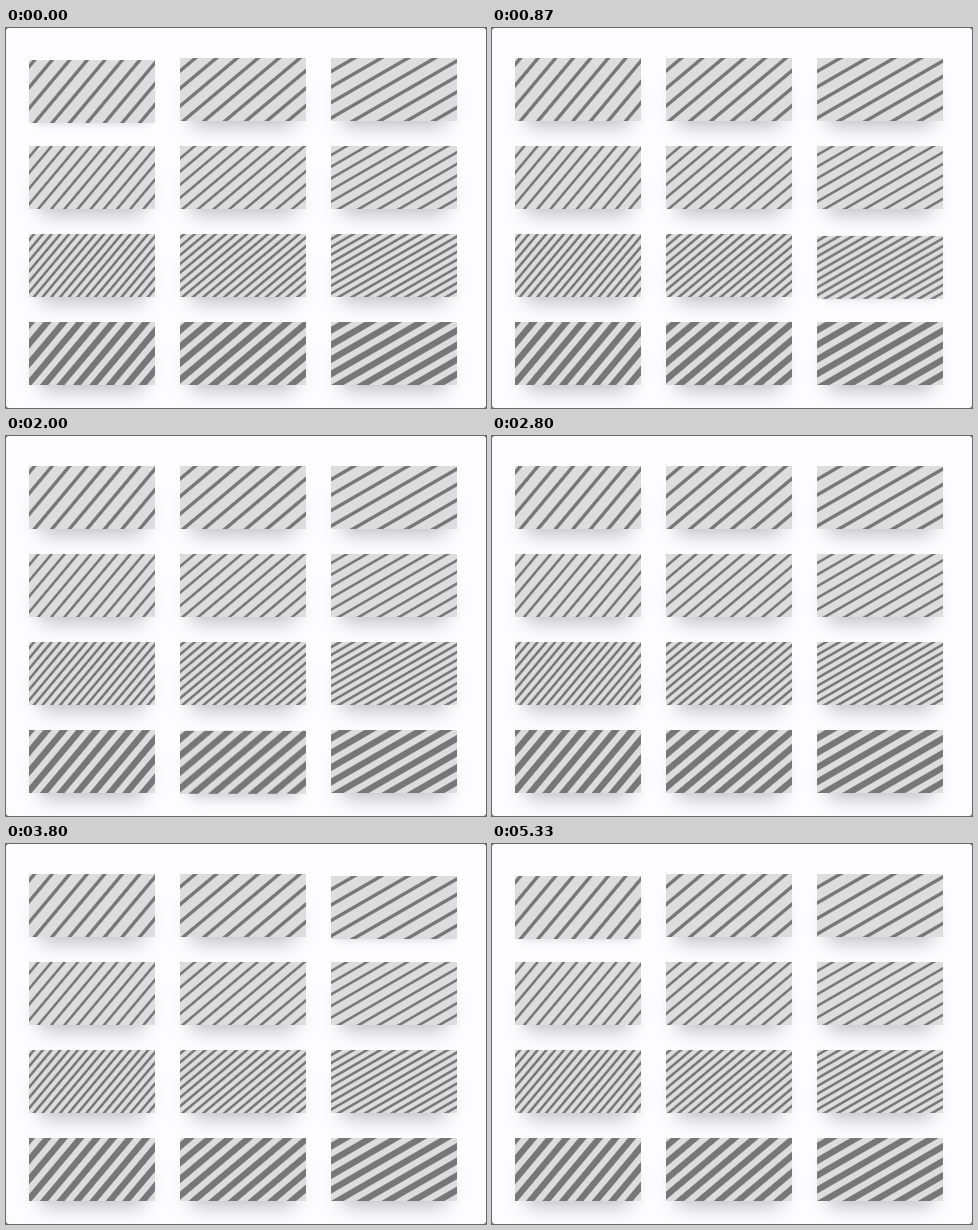
Animation of 480x380 px, one loop 5.47 s. Source, as an HTML page:

```html
<!DOCTYPE html>
<html lang="en">
<head>
<meta charset="utf-8">
<title>Striped cards</title>
<style>
  html, body {
    margin: 0;
    width: 100%;
    height: 100%;
    overflow: hidden;
    background: #666;
  }
  #stage {
    position: relative;
    width: 480px;
    height: 380px;
    overflow: hidden;
    border-radius: 3px;
    background: #fdfcfe;
  }
  /* Half-pixel ramps keep the stripe edges smooth. */
  .card {
    position: absolute;
    width: 126px;
    height: 63px;
    background: repeating-linear-gradient(
      var(--angle),
      #aaa 0,
      #ddd 0.5px calc(var(--gap) - 0.5px),
      #777 calc(var(--gap) + 0.5px) calc(var(--period) - 0.5px),
      #aaa var(--period));
  }
</style>
</head>
<body>
<div id="stage"></div>
<script>
  const LOOP = 5470;
  const FADE = 170;
  const SCALE = 0.84; // cards are 150 x 75 units
  const ANGLES = [-50, -40, -30];
  const STRIPES = [[12, 16], [9, 12], [5, 8], [7.5, 15]]; // gap, period in units

  const RAISED = {
    transform: 'translateY(0px)',
    boxShadow: '0 16px 20px -11px rgba(0, 0, 0, 0.26)'
  };
  const PRESSED = {
    transform: 'translateY(2px)',
    boxShadow: '0 5px 10px -6px rgba(0, 0, 0, 0.2)'
  };

  // Times at which a card, counted row by row, starts to change its pose.
  const TOGGLES = {
    0: [210, 5160],
    2: [3630, 4270],
    4: [300, 670, 2900, 3470, 4360, 5010],
    6: [2100, 2610],
    8: [760, 1250],
    10: [1360, 1940]
  };

  function keyframes(times, pressed) {
    const frames = [];
    const add = time => frames.push({
      ...(pressed ? PRESSED : RAISED),
      offset: time / LOOP,
      easing: 'ease'
    });
    add(0);
    for (const time of times) {
      add(time);
      pressed = !pressed;
      add(time + FADE);
    }
    add(LOOP);
    return frames;
  }

  const stage = document.getElementById('stage');
  STRIPES.forEach(([gap, period], row) => {
    ANGLES.forEach((angle, col) => {
      const index = row * ANGLES.length + col;
      const card = document.createElement('div');
      card.className = 'card';
      card.style.left = `${23 + col * 151}px`;
      card.style.top = `${30 + row * 88}px`;
      card.style.boxShadow = RAISED.boxShadow;
      card.style.setProperty('--angle', `${angle}deg`);
      card.style.setProperty('--gap', `${gap * SCALE}px`);
      card.style.setProperty('--period', `${period * SCALE}px`);
      stage.append(card);
      if (TOGGLES[index]) {
        card.animate(keyframes(TOGGLES[index], index === 0), {
          duration: LOOP,
          iterations: Infinity
        });
      }
    });
  });
</script>
</body>
</html>
```
